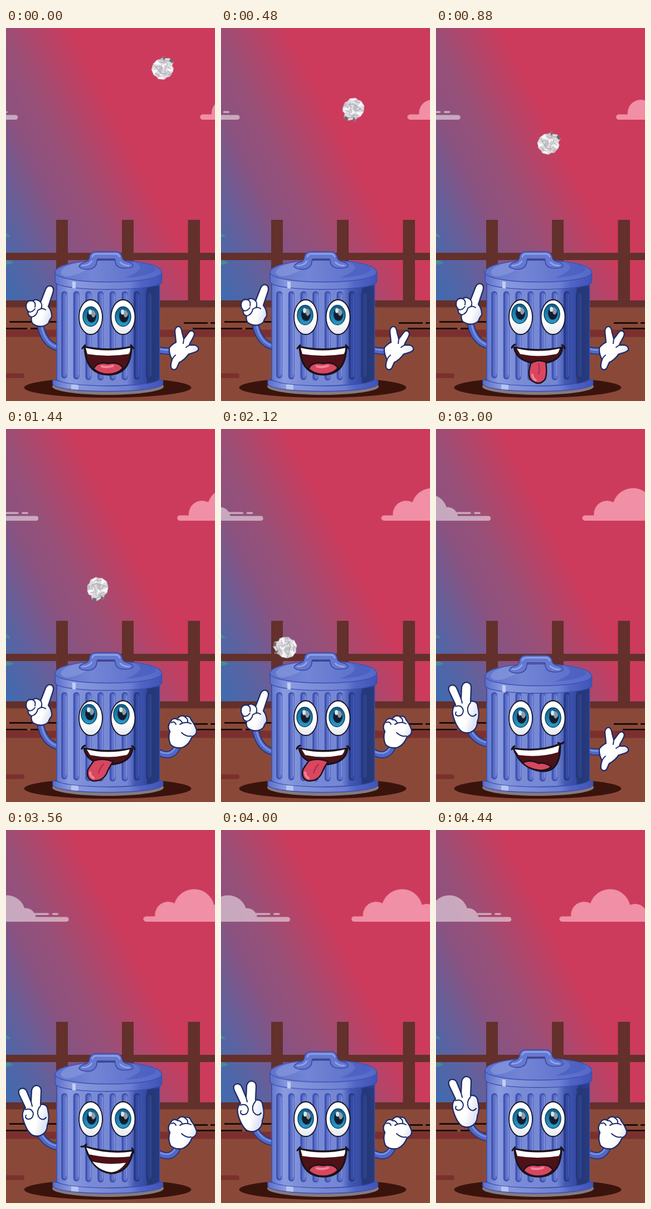
These frames come from a looping animation (375 px wide and 667 px high, 4480 ms). An HTML page:

```html
<!DOCTYPE html>
<html lang="en">
<head>
<meta charset="utf-8">
<title>Hungry bin</title>
<style>
html, body { margin: 0; width: 100%; height: 100%; overflow: hidden; background: #cc3b5c; }
svg { display: block; width: 100%; height: 100%; }
.move { animation: 4480ms linear infinite; }
.show { animation: 4480ms step-end infinite; }

.cloud-l { animation-name: cloud-l; }
.cloud-r { animation-name: cloud-r; }
@keyframes cloud-l { from { transform: translateX(-114px); } to { transform: translateX(1px); } }
@keyframes cloud-r { from { transform: translateX(127px); } to { transform: translateX(-1px); } }

.ball { animation-name: fall; }
.spin { animation-name: spin; }
@keyframes fall {
  0% { transform: translate(281px, 72px); }
  19.64% { transform: translate(202px, 206px); }
  32.14% { transform: translate(165px, 285px); }
  47.32% { transform: translate(116px, 391px); }
  56%, 100% { transform: translate(116px, 455px); }
}
@keyframes spin { to { transform: rotate(-1780deg); } }

.lid { animation-name: lid; }
@keyframes lid {
  0%, 50% { transform: none; }
  66.96% { transform: translateY(5px); }
  79.46% { transform: none; }
  99.11%, 100% { transform: translateY(-7px); }
}
.arm-l { animation-name: arm-l; }
@keyframes arm-l {
  0% { transform: none; }
  19.64%, 32.14% { transform: translateY(-4px); }
  47.32%, 50% { transform: translateY(6px); }
  66.96% { transform: translateY(0); }
  79.46% { transform: translateY(4px); }
  99.11%, 100% { transform: translateY(-12px); }
}
.gaze { animation-name: gaze; }
@keyframes gaze {
  0% { transform: none; }
  19.64% { transform: translate(-2px, -5px); }
  32.14% { transform: translate(-3px, -6px); }
  47.32% { transform: translate(-2px, -1px); }
  62%, 100% { transform: none; }
}

.half1 { animation-name: half1; }
.half2 { animation-name: half2; }
.odd { animation-name: odd; }
.even { animation-name: even; }
.grin { animation-name: grin; }
.lick { animation-name: lick; }
.loll { animation-name: loll; }
.tilt { animation-name: tilt; }
.bite { animation-name: bite; }
@keyframes half1 { 0% { visibility: visible; } 50%, 100% { visibility: hidden; } }
@keyframes half2 { 0% { visibility: hidden; } 50%, 100% { visibility: visible; } }
@keyframes odd { 0%, 50% { visibility: visible; } 25%, 75%, 100% { visibility: hidden; } }
@keyframes even { 0%, 50% { visibility: hidden; } 25%, 75%, 100% { visibility: visible; } }
@keyframes grin { 0%, 87.5%, 100% { visibility: visible; } 12.5% { visibility: hidden; } }
@keyframes lick { 0%, 25%, 100% { visibility: hidden; } 12.5% { visibility: visible; } }
@keyframes loll { 0%, 50%, 100% { visibility: hidden; } 25% { visibility: visible; } }
@keyframes tilt { 0%, 75%, 100% { visibility: hidden; } 50% { visibility: visible; } }
@keyframes bite { 0%, 87.5%, 100% { visibility: hidden; } 75% { visibility: visible; } }

.hand { fill: url(#glove); stroke: #1f2c68; stroke-width: 2.3; stroke-linejoin: round; }
.fold { fill: none; stroke: #1f2c68; stroke-width: 2; stroke-linecap: round; }
.sleeve { fill: none; stroke: #22347f; stroke-width: 13; }
.sleeve + .sleeve { stroke: #5068c4; stroke-width: 9.5; }
.sleeve + .sleeve + .sleeve { stroke: #7a8edc; stroke-width: 3; }
.lips { fill: #4c1217; stroke: #17131a; stroke-width: 3; stroke-linejoin: round; }
.crease { fill: none; stroke: #17131a; stroke-width: 3; stroke-linecap: round; }
.teeth { fill: #fff; }
.tongue { fill: #d9465f; stroke: #17131a; stroke-width: 2.4; }
.shine { fill: none; stroke: #ee8596; stroke-width: 4; stroke-linecap: round; }
.groove { fill: none; stroke: #a52c46; stroke-width: 2; stroke-linecap: round; }
</style>
</head>
<body>
<svg viewBox="0 0 375 667" preserveAspectRatio="none">
  <defs>
    <linearGradient id="sky" gradientUnits="userSpaceOnUse" x1="-195" y1="99" x2="93" y2="-47">
      <stop stop-color="#3f6bb0"/><stop offset=".2" stop-color="#5a63a2"/><stop offset=".48" stop-color="#8c527f"/>
      <stop offset=".64" stop-color="#985078"/><stop offset="1" stop-color="#cc3b5c"/>
    </linearGradient>
    <linearGradient id="tin">
      <stop stop-color="#6478cc"/><stop offset=".12" stop-color="#8b9be0"/><stop offset=".3" stop-color="#7b8cd6"/>
      <stop offset=".68" stop-color="#7486d3"/><stop offset=".76" stop-color="#4459b5"/><stop offset=".87" stop-color="#344aa2"/>
      <stop offset=".9" stop-color="#263a80"/><stop offset="1" stop-color="#2d4290"/>
    </linearGradient>
    <linearGradient id="rim">
      <stop stop-color="#5b6fc8"/><stop offset=".16" stop-color="#8a9bdf"/><stop offset=".45" stop-color="#7b8dd7"/>
      <stop offset=".7" stop-color="#6c80d2"/><stop offset=".8" stop-color="#5065c5"/><stop offset="1" stop-color="#4054b8"/>
    </linearGradient>
    <linearGradient id="top">
      <stop stop-color="#6074ca"/><stop offset=".35" stop-color="#7385d4"/><stop offset="1" stop-color="#5468c8"/>
    </linearGradient>
    <linearGradient id="glove" x2="1" y2=".5">
      <stop offset=".75" stop-color="#fff"/><stop offset="1" stop-color="#dfe3f4"/>
    </linearGradient>
    <linearGradient id="iris" x2="0" y2="1">
      <stop stop-color="#0c5f8c"/><stop offset="1" stop-color="#2b9cc8"/>
    </linearGradient>
    <linearGradient id="white" x2="0" y2="1">
      <stop offset=".6" stop-color="#fff"/><stop offset="1" stop-color="#e4e8f1"/>
    </linearGradient>
    <g id="eye">
      <ellipse rx="14" ry="17.500" fill="url(#iris)" stroke="#0b3f63" stroke-width="1.500"/>
      <ellipse cx="1.500" cy="-1" rx="8.500" ry="11.500" fill="#131c2e"/>
      <path d="M1,-12Q8,-12 9,-4Q7,3 3,1Q-1,-5 1,-12Z" fill="#8b9aa8"/>
      <ellipse cx="-1" cy="-8" rx="3" ry="4.500" fill="#d5e6ee"/>
    </g>
    <g id="paw">
      <path d="M48,529Q44,523 46,517Q38,514 40,507Q34,501 37,492Q40,486 48,488Q54,483 62,490L71,467Q75,459 82,462Q87,465 84,474L76,498Q83,507 82,517Q78,522 76,528Q64,539 48,529Z"/>
    </g>
  </defs>

  <rect width="375" height="667" fill="url(#sky)"/>
  <path d="M0,367Q6,369 8,374Q3,375 0,373ZM0,415Q8,415 13,420Q7,424 0,423Z" fill="#4a8796"/>

  <g class="move cloud-l" fill="#fff" opacity=".5">
    <path d="M-60,164V155H-10A34,34 0 0 1 56,140A18,18 0 0 1 76,155.500H131A4.200,4.200 0 0 1 131,164Z"/>
    <path d="M74,150.300H98M107,150.300H115" stroke="#fff" stroke-width="3.500" stroke-linecap="round"/>
  </g>
  <path class="move cloud-r" fill="#f08fa5" d="M226,164A4.700,4.700 0 0 1 226,154.500H242A24,24 0 0 1 277,131A37,37 0 0 1 348,134A22,22 0 0 1 379,154.500H400V164Z"/>

  <path d="M90,343H111V488H90ZM208,343H229V488H208ZM326.500,343H348V488H326.500ZM0,402H375V415H0ZM0,487H375V500H0Z" fill="#63302b"/>
  <rect y="499.500" width="375" height="168" fill="#8a4938"/>
  <path d="M0,539.500H375V552.500H0ZM0,617.500H30Q33,618 33,622T30,626H0Z" fill="#7b302e"/>
  <path d="M6,525.500H92M0,537.500H38M44,537.500H66M319,527.500H362M367,527.500H375M335,537.500H375" stroke="#1d0d0b" stroke-width="2.800"/>
  <ellipse cx="182.500" cy="643" rx="150" ry="18" fill="#3a140c"/>
  <ellipse cx="183" cy="641" rx="100" ry="15" fill="#857a80"/>

  <g class="move ball"><g class="move spin">
    <path d="M-3,-17L0,-19L2,-23L5,-18L14,-18L16,-14L20,-12L17,-4L20,0L18,7L13,15L8,16L3,20L-2,18L-8,19L-11,15L-16,12L-17,6L-20,2L-17,-8L-12,-11L-10,-15Z" fill="#dcdbdf"/>
    <path d="M-10,-15L-2,-6L-17,-8ZM-2,-6L9,-9L4,4ZM-20,2L-8,3L-16,12ZM4,4L17,-4L19,6ZM-8,19L-3,9L3,20Z" fill="#f7f6f8"/>
    <path d="M0,-18L2,-23L5,-18L3,-14ZM12,-13L14,-18L20,-12L17,-9Z" fill="#6c6971"/>
    <path d="M-8,3L-2,-6L1,0L-3,9ZM13,15L8,11L18,7ZM3,-14L9,-9L-1,-10Z" fill="#bfbdc4"/>
    <path d="M-17,-8L-8,3L-3,9L5,10L4,4L9,-9M-14,9L-6,12M-6,-12L2,-10M8,3L13,9M-13,-2L-4,-4M9,-2L16,1M-10,14L-1,14M4,13L9,7M5,-6L3,1M-6,-16L3,-14L12,-13" fill="none" stroke="#8f8c94" stroke-width=".9"/>
  </g></g>

  <g class="move arm-l">
    <g class="show half1">
      <path class="sleeve" d="M95,572Q67,566 61,528"/><path class="sleeve" d="M95,572Q67,566 61,528"/><path class="sleeve" d="M93,571Q68,564 63,528"/>
      <use href="#paw" class="hand"/>
      <path class="fold" d="M48,488Q54,491 52,499M62,490Q66,495 63,502M40,507Q46,510 52,502M46,517Q55,515 57,505Q65,499 71,504"/>
    </g>
    <g class="show half2">
      <path class="sleeve" d="M95,563Q70,560 58,534"/><path class="sleeve" d="M95,563Q70,560 58,534"/><path class="sleeve" d="M93,561Q71,558 61,534"/>
      <path class="hand" d="M42,537C35,529 28,510 30,502Q31,496 35,493L24,470Q20,460 28,458Q35,457 38,465L45,482L46,461Q49,452 56,453Q64,455 63,464L62,487Q74,485 75,497Q79,512 74,524Q74,538 60,543Q48,545 42,537Z"/>
      <path class="fold" d="M45,482L47,490M35,496Q46,492 49,503Q48,514 39,513Q33,511 36,506M62,489Q54,498 58,508Q65,518 72,510"/>
    </g>
  </g>

  <g class="show odd">
    <path class="sleeve" d="M270,575Q286,579 299,577"/><path class="sleeve" d="M270,575Q286,579 299,577"/><path class="sleeve" d="M270,573Q286,577 299,575"/>
    <path class="hand" d="M293,572Q297,566 305,562L303,542Q304,533 311,534Q315,536 316,545L319,556L328,544Q335,538 338,546Q338,551 331,562L329,567L339,567Q347,570 345,576Q342,580 328,583Q320,594 311,598L306,609Q300,614 296,607Q295,601 298,593Q292,583 293,572Z"/>
    <path class="fold" d="M319,556L318,564M329,567L323,571M298,593Q300,588 304,585"/>
  </g>
  <g class="show even">
    <path class="sleeve" d="M270,576Q300,594 310,562"/><path class="sleeve" d="M270,576Q300,594 310,562"/><path class="sleeve" d="M270,574Q298,590 307,562"/>
    <path class="hand" d="M295,564Q290,551 294,541Q288,532 295,524Q299,515 307,519Q312,510 321,514Q330,512 332,520Q338,527 342,538Q343,547 334,550Q329,564 318,569Q304,573 295,564Z"/>
    <path class="fold" d="M297,525Q302,522 305,528M308,520Q313,519 316,525M321,515Q327,518 326,524M312,528Q323,522 332,527M315,543Q324,551 332,549"/>
  </g>

  <path d="M84,629Q183,646 281.500,629V637C272,654 93,654 84,637Z" fill="url(#rim)" stroke="#3a4eb2" stroke-width="1.500"/>
  <path d="M91,448H275.500V629Q260,639 183,640Q106,639 91,629Z" fill="url(#tin)" stroke="#3a4eb2" stroke-width="1.500"/>
  <g id="ribs" fill="none" stroke-linecap="round"></g>
  <path d="M252,462H275V629Q266,634 252,636Z" fill="#22346f" opacity=".5"/>
  <path d="M117,637L130,638V647L117,646Z" fill="#b7c3f0"/>

  <g class="move lid">
    <path d="M88,437V454C94,472 274,472 279.500,454V437Z" fill="url(#rim)" stroke="#3a4eb2" stroke-width="1.500"/>
    <path d="M119,453V465L125,466V454Z" fill="#c3cdf3"/>
    <path d="M88,437C90,408 277,408 279.500,437C277,460 91,460 88,437Z" fill="url(#top)" stroke="#3d51b8" stroke-width="1.500"/>
    <path d="M99,434C108,421 135,417 160,418C150,431 125,445 107,444Q96,441 99,434Z" fill="#8797dd" opacity=".7"/>
    <path d="M213,447Q258,444 270,432Q266,422 232,420Q256,430 213,447Z" fill="#465bbf" opacity=".6"/>
    <path d="M131,427Q132,421 141,419Q150,417 150,408Q152,401 160,400H198Q206,401 208,408Q208,416 218,418Q228,420 228,426Q222,431 207,429Q196,427 196,416L195,413H164L163,416Q163,428 152,431Q138,433 131,427Z" fill="#6579d0" stroke="#3548a8" stroke-width="1.500"/>
    <path d="M155,409Q156,404 162,404H197Q202,404 204,409M137,425Q149,425 154,417M205,419Q211,425 221,425" fill="none" stroke="#94a4e6" stroke-width="2.500" stroke-linecap="round"/>
  </g>

  <g fill="url(#white)" stroke="#15151f" stroke-width="1.800">
    <ellipse cx="152" cy="517" rx="21" ry="31"/><ellipse cx="210" cy="517" rx="21.500" ry="31"/>
  </g>
  <g class="move gaze"><use href="#eye" x="152" y="516"/><use href="#eye" x="210" y="516"/></g>

  <g class="show grin">
    <path class="lips" d="M141,570Q183,579 225,570Q224,620 183,620Q143,619 141,570Z"/>
    <path class="teeth" d="M143,572Q183,581 223,572Q223,580 220,583Q183,589 146,583Z"/>
    <path class="tongue" d="M157,609Q164,596 183,600Q202,596 210,608Q200,619 183,619Q167,619 157,609Z" stroke="none"/>
    <path class="shine" d="M172,605Q182,608 192,604"/>
    <path class="crease" d="M137,573Q139,570 142,567M224,567Q227,570 229,573"/>
  </g>
  <g class="show lick">
    <path class="lips" d="M140,571Q184,580 227,571Q224,599 184,600Q145,598 140,571Z"/>
    <path class="teeth" d="M145,573Q184,582 222,573Q220,581 216,583Q184,590 151,583Z"/>
    <path class="tongue" d="M170,600Q180,592 197,597Q200,617 196,628Q186,640 174,632Q162,626 170,600Z"/>
    <path class="groove" d="M184,601Q187,612 184,618"/>
    <path class="shine" d="M173,620Q173,626 179,630"/>
    <path class="crease" d="M136,572Q137,568 142,566M226,567Q230,568 231,573"/>
  </g>
  <g class="show loll">
    <path class="lips" d="M140,571Q184,580 227,571Q224,599 184,600Q145,598 140,571Z"/>
    <path class="teeth" d="M145,573Q184,582 222,573Q220,581 216,583Q184,590 151,583Z"/>
    <path class="tongue" d="M158,593Q176,588 192,595Q184,607 180,617Q172,631 155,629Q143,624 147,609Q151,602 158,593Z"/>
    <path class="groove" d="M175,599Q169,606 166,615"/>
    <path class="shine" d="M151,614Q151,621 157,624"/>
    <path class="crease" d="M136,572Q137,568 142,566M226,567Q230,568 231,573"/>
  </g>
  <g class="show tilt">
    <path class="lips" d="M139,571Q188,578 223,563Q224,614 190,612Q152,608 139,571Z"/>
    <path class="teeth" d="M141,573Q188,579 221,566L219,578Q188,588 148,583Z"/>
    <path class="tongue" d="M155,597Q168,590 184,598Q195,595 207,604Q196,612 183,610Q165,607 155,597Z" stroke="none"/>
    <path class="crease" d="M136,573Q137,569 141,567M219,561Q225,565 229,560"/>
  </g>
  <g class="show bite">
    <path class="lips" d="M142,566Q184,579 228,573Q221,613 189,614Q155,611 142,566Z"/>
    <path class="teeth" d="M144,568Q184,581 226,575L222,584Q184,588 149,580ZM155,593Q184,600 215,595Q204,611 189,612Q168,610 155,593Z"/>
    <path class="crease" d="M135,566Q140,567 144,562M226,569Q229,572 229,577"/>
  </g>
</svg>
<script>
// Fluted ribs follow the curved foot of the can.
const ribs = document.getElementById("ribs");
const line = (x, y1, y2, color, width) =>
  `<path d="M${x},${y1}V${y2}" stroke="${color}" stroke-width="${width}"/>`;
let out = "";
for (let i = 0; i < 8; i++) {
  const x = 104.5 + 21.7 * i;
  const end = 625 - ((x - 183) / 40) ** 2;
  const shade = x > 225;
  out += line(x, 476, end, shade ? "#263a85" : "#3f53b2", 11)
       + line(x + 1.5, 477, end - 1, shade ? "#364ba3" : "#6073c9", 7)
       + line(x + 3.5, 478, end - 3, shade ? "#4359b4" : "#7e90da", 2);
}
ribs.innerHTML = out;
</script>
</body>
</html>
```
